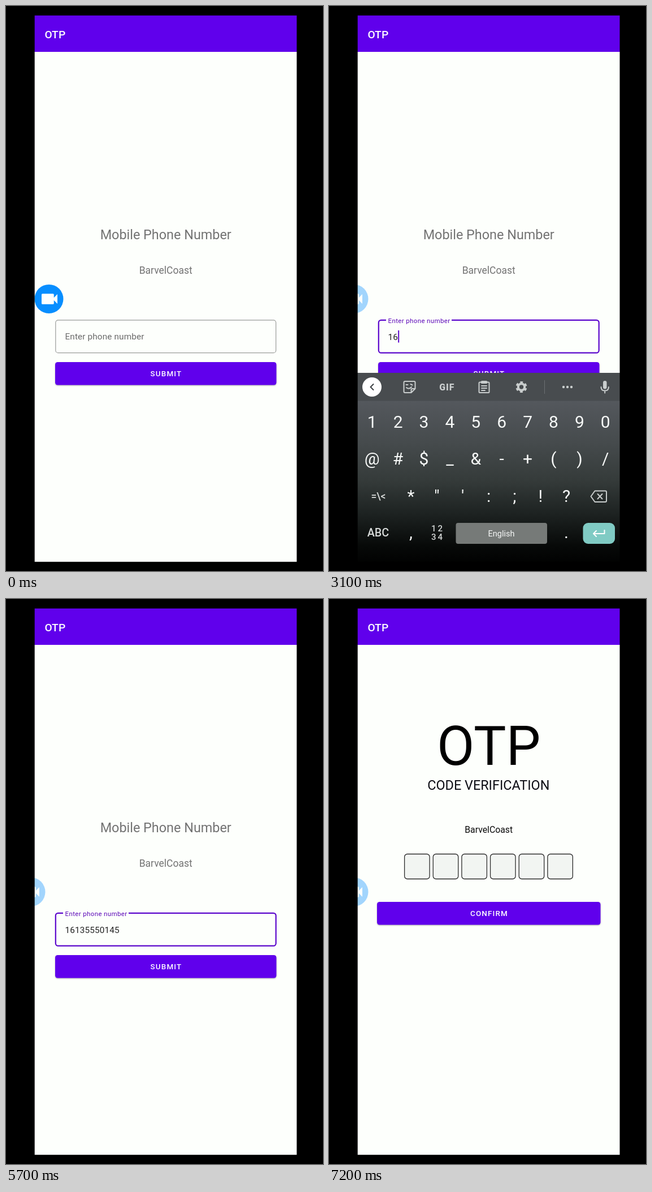
These frames come from a looping animation (561 px wide and 998 px high, 8 s). An HTML page:

```html
<!DOCTYPE html>
<html lang="en">
<head>
<meta charset="utf-8">
<title>OTP</title>
<style>
  html, body { margin: 0; width: 100%; height: 100%; overflow: hidden; background: #000; }
  svg { display: block; width: 100%; height: 100%; font-family: Roboto, Arial, sans-serif; }
  text { white-space: pre; }
  .mid { text-anchor: middle; }
  .btn { font-size: 13.4px; font-weight: 500; letter-spacing: .0893em; text-anchor: middle; fill: #fff; }
  .raised { fill: #6000ec; filter: drop-shadow(0 1.5px 1.2px rgba(0, 0, 0, .3)); }
  .input { font-size: 15.3px; letter-spacing: .0094em; }
  .key { font-size: 30px; text-anchor: middle; fill: #f7f9f8; }
  .mode { font-weight: 500; text-anchor: middle; fill: #d5d8d7; }
  .line { fill: none; stroke: #c9cdcd; stroke-width: 2; stroke-linejoin: round; stroke-linecap: round; }
  .solid { fill: #c9cdcd; }
</style>
</head>
<body>
<svg viewBox="0 0 561 998">
  <defs>
    <clipPath id="submitClip"><rect x="87" y="629" width="391.5" height="40.5" rx="4.5"/></clipPath>
    <linearGradient id="keysFill" x1="0" y1="0" x2="0" y2="1">
      <stop offset="0" stop-color="#54585d"/>
      <stop offset=".25" stop-color="#464b4d"/>
      <stop offset=".48" stop-color="#353b3a"/>
      <stop offset=".7" stop-color="#1b201f"/>
      <stop offset=".88" stop-color="#070908"/>
      <stop offset="1" stop-color="#000"/>
    </linearGradient>
  </defs>

  <rect x="45" y="10" width="475" height="980" fill="#fdfffc"/>

  <g id="phoneScreen">
    <text class="mid" x="282.7" y="412" font-size="23.4" fill="#737373">Mobile Phone Number</text>
    <text class="mid" x="282.7" y="472.5" font-size="17.5" fill="#737373">BarvelCoast</text>
    <rect id="outline" x="87.8" y="554.8" width="389.9" height="57.9" rx="4.5" fill="none"/>
    <rect id="notch" y="551" height="8" fill="#fdfffc"/>
    <text id="label" x="104.5">Enter phone number</text>
    <text id="value" class="input" x="104.5" y="590" fill="#222"></text>
    <rect id="caret" y="573" width="2" height="21.5" fill="#5b06cc"/>
    <rect class="raised" x="87" y="629" width="391.5" height="40.5" rx="4.5"/>
    <circle id="ripple" cy="649.5" fill="#fff" clip-path="url(#submitClip)"/>
    <text class="btn" x="283.5" y="654.4">SUBMIT</text>
  </g>

  <g id="codeScreen">
    <rect x="45" y="81" width="475" height="909" fill="#fdfffc"/>
    <text class="mid" x="282.7" y="293" font-size="96.5">OTP</text>
    <text class="mid" x="282.3" y="337" font-size="23.4" fill="#0c0c14">CODE VERIFICATION</text>
    <text class="mid" x="282.7" y="412.6" font-size="15.8" fill="#0a0a0a">BarvelCoast</text>
    <g id="cells" fill="#f2f5f2" stroke="#2a2a2a" stroke-width="1.3"></g>
    <rect class="raised" x="85" y="535" width="395.5" height="40.5" rx="4.5"/>
    <text class="btn" x="283.5" y="560.4">CONFIRM</text>
  </g>

  <rect x="45" y="10" width="475" height="71" fill="#6000ec"/>
  <text x="68.4" y="57.2" font-size="19.2" font-weight="500" letter-spacing=".0125em" fill="#fff">OTP</text>

  <g id="bubble">
    <circle cx="76" cy="517.4" r="25.5" fill="#088eff"/>
    <path fill="#fff" transform="translate(58.3 498.8) scale(1.556)"
      d="M17 10.5V7q0-1-1-1H4q-1 0-1 1v10q0 1 1 1h12q1 0 1-1v-3.5l4 4v-11z"/>
  </g>

  <g id="keyboard">
    <rect x="45" y="648" width="475" height="50" fill="#484c4f"/>
    <rect x="45" y="697.5" width="475" height="292" fill="url(#keysFill)"/>

    <circle cx="76" cy="673" r="17" fill="#fff"/>
    <path class="line" style="stroke:#3c4043" d="M78.5 668l-5 5 5 5"/>
    <g class="line">
      <path d="M134.500 663h16q2 0 2 2v11l-7 7h-11q-2 0-2-2v-16q0-2 2-2zM152.500 676h-5q-2 0-2 2v5"/>
      <path d="M136.500 669h3M144.500 668l3 1.500M137 674q4.500 4 9-1"/>
      <path d="M267 664.500h15q1.500 0 1.500 1.500v15.500q0 1.500-1.500 1.500h-15q-1.500 0-1.500-1.500v-15.500q0-1.500 1.500-1.500zM270 671h9M270 675h9M270 679h6"/>
      <path d="M271 664.500h7" stroke-width="5"/>
      <path d="M481.500 673q0 6.500 6.700 6.500t6.700-6.500M488.200 680v3.500"/>
      <path d="M470.500 856.500h18.500q2 0 2 2v15.500q0 2-2 2h-18.500l-7-9.750zM475.500 862l8 8.500M483.500 862l-8 8.500"/>
    </g>
    <g transform="translate(340.5 673)" fill="none" stroke="#c9cdcd">
      <circle r="5.7" stroke-width="4"/>
      <circle r="8.3" stroke-width="3.6" stroke-dasharray="4.6 4.092" transform="rotate(14.1)"/>
    </g>
    <rect class="solid" x="485" y="662" width="6.5" height="14.5" rx="3.25"/>
    <text class="solid mid" x="208.8" y="678.7" font-size="15.8" font-weight="900" letter-spacing=".9">GIF</text>
    <path d="M381.5 661v24" stroke="#6c7073"/>
    <g class="solid">
      <circle cx="415" cy="673" r="2.2"/><circle cx="422" cy="673" r="2.2"/><circle cx="429" cy="673" r="2.2"/>
    </g>

    <g id="keys"></g>
    <text class="mode" x="87.5" y="872" font-size="17.5">=\&lt;</text>
    <text class="mode" x="87" y="937" font-size="19.8">ABC</text>
    <g class="mode" font-size="15" letter-spacing="3">
      <text x="192.5" y="927.5">12</text><text x="192.5" y="942.5">34</text>
    </g>
    <rect x="224.5" y="913" width="161.5" height="37" rx="4" fill="#767a78"/>
    <text class="mid" x="305" y="936.5" font-size="14.5" fill="#f7f9f8">English</text>
    <rect x="449.5" y="913" width="56.5" height="37" rx="9" fill="#80cbc4"/>
    <path class="line" style="stroke:#fff" d="M487.5 926v6h-19M473 927l-5 5 5 5"/>

    <g id="popup">
      <rect x="-23" y="628" width="46.5" height="131" rx="4" fill="#7d817e"/>
      <text id="popupDigit" class="key" x="0" y="670"></text>
      <path d="M9 683h2M13 683h2M17 683h2" stroke="#f0f2f1" stroke-width="2"/>
    </g>
  </g>

  <!-- black surround of the phone screen -->
  <path fill-rule="evenodd" d="M0 0H561V998H0zM50.700 16.700V981.700H514.500V16.700z"/>
</svg>
<script>
const LOOP = 8000;
const NUMBER = "16135550145";
// press and release time of each digit
const TAPS = [
  [2800, 2900], [3000, 3100], [3300, 3400], [3400, 3500], [3500, 3600], [3800, 3900],
  [4000, 4100], [4200, 4300], [4400, 4500], [4600, 4700], [4900, 5100]
];
const FOCUS = 1000;
const DIGIT = 8.69;

const $ = id => document.getElementById(id);
const put = (el, attrs) => {
  for (const k in attrs) el.setAttribute(k, attrs[k]);
};
const set = (id, attrs) => put($(id), attrs);
const lerp = (a, b, p) => a + (b - a) * p;
const prog = (t, from, to) => Math.min(1, Math.max(0, (t - from) / (to - from)));
const easeOut = p => 1 - (1 - p) ** 3;
const smooth = p => p * p * (3 - 2 * p);
const keyX = i => 76.2 + 45.9 * i;

function add(parent, tag, attrs) {
  const el = document.createElementNS("http://www.w3.org/2000/svg", tag);
  put(el, attrs);
  $(parent).append(el);
  return el;
}

function addKey(x, y, s) {
  add("keys", "text", { class: "key", x, y }).textContent = s;
}

[..."1234567890"].forEach((c, i) => addKey(keyX(i), 745, c));
[..."@#$_&-+()/"].forEach((c, i) => addKey(keyX(i), 810, c));
[..."*\"':;!?"].forEach((c, i) => addKey(145 + 45.85 * i, 876, c));
addKey(145, 940, ",");
addKey(420, 940, ".");

for (let i = 0; i < 6; i++) {
  add("cells", "rect", { x: 133.6 + 50.65 * i, y: 450.5, width: 44.5, height: 44, rx: 5 });
}

function drawField(t) {
  const p = smooth(prog(t, FOCUS, FOCUS + 200));
  const on = t >= FOCUS;
  set("outline", { stroke: on ? "#5b06cc" : "#9a9c9a", "stroke-width": on ? 2.2 : 1.2 });
  set("notch", { x: lerp(159, 101, p), width: 116 * p });
  set("label", {
    y: lerp(589, 559.6, p),
    "font-size": lerp(15.3, 11.5, p),
    "letter-spacing": lerp(.14, .37, p),
    fill: on ? "#5b06b8" : "#6a6a6a"
  });

  const typed = TAPS.filter(tap => t >= tap[1]).length;
  const last = typed ? TAPS[typed - 1][1] : FOCUS;
  const lit = on && Math.floor((t - last) / 500) % 2 === 0;
  $("value").textContent = NUMBER.slice(0, typed);
  set("caret", { x: 104.8 + typed * DIGIT, opacity: lit ? 1 : 0 });
}

function drawKeyboard(t) {
  const up = easeOut(prog(t, 1480, 1800)) - smooth(prog(t, 5280, 5650));
  set("keyboard", {
    transform: `translate(0 ${334 * (1 - up)})`,
    visibility: up > 0 ? "visible" : "hidden"
  });
  const i = TAPS.findIndex(([a, b]) => t >= a && t < b);
  set("popup", { opacity: i < 0 ? 0 : 1 });
  if (i >= 0) {
    set("popup", { transform: `translate(${keyX((+NUMBER[i] + 9) % 10)} 0)` });
    $("popupDigit").textContent = NUMBER[i];
  }
}

function draw(t) {
  const tuck = smooth(prog(t, 80, 600));
  set("bubble", { transform: `translate(${-32 * tuck} 0)`, opacity: lerp(1, .37, tuck) });

  drawField(t);
  drawKeyboard(t);

  const p = prog(t, 6250, 6590);
  set("ripple", {
    cx: lerp(430, 282, p),
    r: p ? lerp(60, 200, p) : 0,
    opacity: .085 * (1 - prog(t, 6600, 6850))
  });
  set("codeScreen", { opacity: smooth(prog(t, 6650, 7000)) });
}

const start = performance.now();
function tick() {
  draw((performance.now() - start) % LOOP);
  requestAnimationFrame(tick);
}
tick();
</script>
</body>
</html>
```
